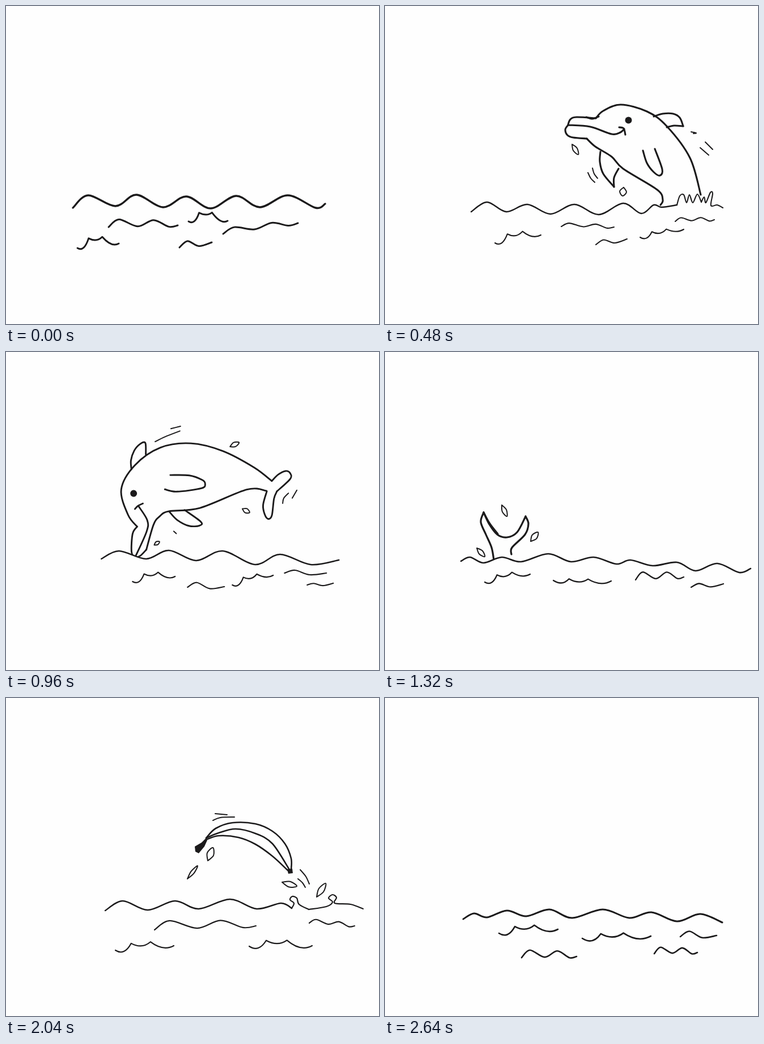
Write an HTML page with a canvas that moves like this. It is 658 by 561 pixels and loops after 2760 ms.

```html
<!DOCTYPE html>
<html lang="en">
<head>
<meta charset="utf-8">
<title>Dolphin and banana</title>
<style>
html, body { margin: 0; width: 100%; height: 100%; overflow: hidden; background: #fefefe; }
canvas { display: block; }
</style>
</head>
<body>
<canvas id="stage" width="658" height="561"></canvas>
<script>
const ctx = document.getElementById('stage').getContext('2d');
const INK = '#1b1a1b', PAPER = '#fefefe', STEP = 120, STEPS = 23;

// Smooth curve through points given as x, y, x, y, ...
function spline(...n) {
  const path = new Path2D(), last = n.length / 2 - 1;
  const at = i => {
    const k = 2 * Math.max(0, Math.min(last, i));
    return [n[k], n[k + 1]];
  };
  path.moveTo(...at(0));
  for (let i = 0; i < last; i++) {
    const a = at(i - 1), b = at(i), c = at(i + 1), d = at(i + 2);
    path.bezierCurveTo(b[0] + (c[0] - a[0]) / 6, b[1] + (c[1] - a[1]) / 6,
      c[0] - (d[0] - b[0]) / 6, c[1] - (d[1] - b[1]) / 6, ...c);
  }
  return path;
}

function pen(...n) {
  ctx.stroke(spline(...n));
}

function blot(shape) {
  ctx.fill(new Path2D(`M${shape}Z`));
}

function eye(x, y) {
  ctx.beginPath();
  ctx.arc(x, y, 6, 0, 7);
  ctx.fill();
}

// Water drop: two bowed lines between its tips.
function drop(x1, y1, x2, y2, bow) {
  const mx = (x1 + x2) / 2, my = (y1 + y2) / 2, len = Math.hypot(x2 - x1, y2 - y1);
  const ox = (y2 - y1) / len * bow, oy = (x1 - x2) / len * bow;
  pen(x1, y1, mx + ox, my + oy, x2, y2, mx - ox, my - oy, x1, y1);
}

// Surface line that hides whatever is below it.
function surface(width, ...n) {
  const water = spline(...n);
  water.lineTo(n[n.length - 2], 561);
  water.lineTo(n[0], 561);
  ctx.fillStyle = PAPER;
  ctx.fill(water);
  ctx.lineWidth = width;
  pen(...n);
  ctx.lineWidth = width * .87;
}

// Three hanging arcs that meet in two cusps.
function cusps(x1, y1, x2, y2, h) {
  const w = x2 - x1, tops = [0, .27, .6, 1];
  const point = i => [x1 + w * tops[i], y1 + (y2 - y1) * tops[i] - (i % 3 ? h : 0)];
  ctx.beginPath();
  ctx.moveTo(x1, y1);
  for (let i = 1; i < 4; i++) {
    const [ax, ay] = point(i - 1), [bx, by] = point(i);
    ctx.quadraticCurveTo((ax + bx) / 2 + 2, Math.max(ay, by) + w * .1, bx, by);
  }
  ctx.stroke();
}

// Low wavy line with one or two bumps.
function ripple(x1, y1, x2, y2, h, bumps = 2) {
  const at = (f, up) => [x1 + (x2 - x1) * f, y1 + (y2 - y1) * f - up];
  if (bumps === 1) pen(x1, y1, ...at(.25, h), ...at(.6, -3), x2, y2);
  else pen(x1, y1, ...at(.15, h), ...at(.42, 0), ...at(.65, h * .8), ...at(.87, -2), x2, y2);
}

function calm() {
  surface(3.4, 118, 356, 145, 334, 193, 353, 230, 333, 277, 355, 318, 336,
    361, 357, 406, 335, 448, 355, 497, 334, 546, 356, 563, 349);
  ripple(181, 390, 303, 387, 13);
  cusps(322, 380, 391, 379, 15);
  ripple(383, 402, 515, 383, 9);
  cusps(126, 427, 199, 419, 15);
  ripple(306, 426, 363, 417, 9, 1);
}

function leaping() {
  surface(2.4, 152, 363, 180, 346, 214, 363, 251, 350, 292, 367, 334, 350,
    377, 368, 420, 348, 452, 366, 474, 351, 488, 355, 515, 351);
  pen(515, 351, 520, 335, 527, 333, 532, 347, 537, 333, 543, 347, 551, 332, 558, 346);
  pen(558, 346, 563, 337, 566, 347, 574, 329, 578, 331, 575, 352, 586, 351, 596, 356);
  ripple(311, 389, 404, 390, 6);
  cusps(194, 418, 275, 404, 12);
  ripple(372, 421, 427, 411, 6, 1);
  cusps(450, 408, 527, 394, 6);
  ripple(512, 380, 581, 377, 6);
}

function flying() {
  surface(2.5, 171, 362, 202, 348, 250, 362, 290, 347, 338, 365, 385, 348,
    442, 372, 486, 354, 540, 372, 590, 364);
  cusps(226, 402, 301, 393, 11);
  ripple(323, 412, 388, 411, 8, 1);
  cusps(402, 408, 474, 391, 9);
  ripple(494, 387, 568, 387, 5, 1);
  ripple(534, 408, 580, 405, 2, 1);
}

function diving() {
  surface(2.6, 134, 369, 150, 362, 174, 372, 206, 362, 240, 370, 288, 356, 328, 370,
    368, 362, 408, 374, 433, 367, 472, 377, 515, 371, 548, 386, 586, 373, 625, 389, 645, 382);
  cusps(176, 406, 256, 392, 9);
  cusps(297, 403, 399, 404, 3);
  ripple(442, 402, 527, 397, 13);
  ripple(540, 415, 597, 409, 5, 1);
}

function peeking() {
  surface(2.6, 134, 371, 153, 359, 193, 374, 236, 359, 276, 373, 330, 352,
    381, 368, 429, 348, 472, 367, 512, 353, 541, 370, 578, 360, 618, 371);
  ripple(173, 421, 298, 415, 10);
  cusps(286, 462, 384, 447, 9);
  ripple(364, 418, 475, 414, 12);
  cusps(498, 442, 603, 423, 12);
}

function splashing() {
  surface(2.5, 175, 375, 206, 358, 250, 374, 298, 358, 340, 372, 395, 355,
    442, 372, 485, 362, 504, 371);
  pen(504, 371, 508, 362, 501, 356, 505, 350, 513, 353, 517, 364, 534, 373);
  pen(534, 373, 565, 368, 576, 360, 569, 353, 576, 347, 583, 352, 580, 362, 608, 364, 630, 372);
  ripple(262, 409, 441, 402, 15);
  cusps(193, 445, 296, 437, 10);
  cusps(429, 438, 540, 437, 10);
  ripple(535, 397, 615, 402, 7);
}

function settled() {
  surface(3, 138, 390, 157, 380, 180, 387, 215, 375, 249, 385, 290, 373,
    330, 388, 384, 373, 431, 388, 470, 378, 515, 394, 556, 381, 595, 396);
  cusps(201, 415, 305, 408, 10);
  cusps(348, 424, 469, 420, 7);
  ripple(521, 421, 585, 419, 9, 1);
  ripple(241, 458, 338, 456, 13);
  ripple(475, 451, 551, 449, 11);
}

function rising() {
  ctx.lineWidth = 3.1;
  pen(323, 209, 327, 200, 338, 196, 372, 198);
  pen(372, 198, 385, 185, 416, 174, 462, 186, 497, 212, 538, 268, 557, 333);
  pen(323, 210, 362, 213, 400, 226, 415, 223, 422, 217);
  pen(413, 214, 421, 216, 424, 227);
  pen(323, 210, 318, 218, 322, 228, 332, 232, 356, 234);
  pen(356, 234, 371, 248, 400, 266, 420, 287, 480, 324, 490, 342, 486, 351);
  pen(355, 196, 366, 199, 377, 195);
  pen(474, 195, 490, 190, 508, 190, 520, 197, 526, 212);
  pen(526, 212, 510, 211, 497, 214);
  pen(380, 257, 379, 275, 385, 296, 404, 319);
  pen(404, 319, 404, 303, 412, 287);
  pen(455, 255, 462, 277, 474, 293, 485, 299, 489, 288, 476, 252);
  eye(429.5, 201.5);
  ctx.lineWidth = 2;
  drop(330, 244, 341, 262, 4);
  drop(421, 320, 419, 335, 6);
  pen(358, 294, 363, 304, 370, 311);
  pen(366, 286, 369, 296, 375, 304);
  pen(540, 222, 549, 224, 544, 225);
  pen(565, 240, 578, 253);
  pen(556, 250, 571, 263);
}

function airborne() {
  ctx.lineWidth = 2.9;
  pen(247, 191, 247, 165, 265, 122, 310, 103, 365, 106, 412, 133, 448, 178, 474, 235, 484, 273);
  pen(247, 191, 233, 196, 212, 220, 211, 231, 220, 235, 235, 233);
  pen(235, 233, 272, 206, 290, 201, 308, 204, 355, 233, 440, 258, 466, 281);
  pen(212, 231, 255, 208, 268, 193, 271, 165);
  pen(263, 164, 271, 163, 280, 165);
  pen(301, 105, 310, 92, 325, 82, 340, 79, 349, 83, 337, 100);
  pen(326, 169, 340, 185, 378, 207, 388, 205, 388, 196, 375, 176, 349, 155);
  pen(308, 205, 310, 225, 320, 246, 335, 257, 341, 253, 331, 219);
  pen(484, 273, 500, 271, 514, 274, 518, 282, 512, 290, 480, 293);
  pen(480, 293, 468, 300, 447, 321, 438, 322, 438, 312, 446, 297, 466, 282);
  eye(278, 141);
  ctx.lineWidth = 2;
  drop(463, 180, 480, 184, 4);
  drop(251, 235, 262, 236, 3);
  drop(413, 280, 419, 293, 4);
  pen(293, 237, 294, 243);
  pen(364, 92, 383, 96, 410, 104);
  pen(400, 91, 416, 98);
  pen(475, 316, 482, 310, 494, 308);
  pen(494, 319, 509, 313);
}

function tail() {
  ctx.lineWidth = 3.2;
  pen(192, 367, 188, 345, 178, 322, 169, 300, 174, 283);
  pen(174, 283, 184, 304, 198, 322, 215, 327, 233, 318, 248, 290);
  pen(174, 283, 185, 303, 199, 321);
  pen(248, 290, 253, 303, 247, 322, 224, 345, 223, 357);
  ctx.lineWidth = 2;
  drop(206, 270, 215, 290, 4);
  drop(257, 334, 270, 318, 5);
  drop(162, 346, 176, 361, 4);
}

function bananaTip() {
  ctx.lineWidth = 2.9;
  pen(489, 300, 505, 322, 513, 340, 515, 356);
  pen(495, 297, 515, 315, 529, 340, 537, 369);
  pen(495, 295, 520, 306, 541, 325, 551, 345, 552, 369);
  blot('477 291L483 286L495 291L489 301L479 297');
  ctx.lineWidth = 2.2;
  pen(472, 325, 477, 324, 484, 332);
  pen(529, 294, 538, 300);
  pen(521, 301, 536, 309);
  drop(560, 328, 559, 344, 3);
}

function banana() {
  ctx.lineWidth = 2.6;
  pen(353, 247, 370, 230, 400, 220, 440, 222, 470, 235, 492, 257, 503, 283, 503, 303);
  pen(353, 247, 375, 238, 405, 231, 440, 239, 470, 257, 500, 303);
  pen(353, 250, 375, 243, 410, 246, 440, 258, 470, 279, 497, 304);
  blot('333 262L345 255L353 247L355 251L350 262L340 274L334 271');
  blot('496 302L505 301L506 309L498 310');
  ctx.lineWidth = 2;
  drop(356, 287, 365, 264, 6);
  drop(320, 319, 338, 296, 3);
  drop(487, 325, 513, 332, 5);
  drop(548, 351, 564, 327, 5);
  pen(369, 204, 390, 206);
  pen(365, 216, 378, 211, 403, 210);
  pen(519, 303, 529, 315, 535, 328);
  pen(515, 319, 523, 326, 528, 334);
}

function place(figure, px, py, dx, dy, turn) {
  ctx.save();
  ctx.translate(px + dx, py + dy);
  ctx.rotate(turn);
  ctx.translate(-px, -py);
  figure();
  ctx.restore();
}

function drawFigure(step) {
  const flight = step - 6, slip = step - 17;
  if (step < 1) return;
  if (step < 5) {
    const left = 4 - step;
    place(rising, 520, 350, 20 * left, 62 * left, .17 * left);
  } else if (step < 11) {
    place(airborne, 360, 190, -10 * flight * Math.abs(flight), 12 * flight ** 2, -.33 * flight);
  } else if (step < 13) {
    place(tail, 210, 350, 0, 50 * (step - 11), 0);
  } else if (step === 14 || step === 15) {
    place(bananaTip, 520, 350, 0, 45 * (15 - step), 0);
  } else if (step > 15 && step < 21) {
    place(banana, 425, 270, -32 * slip, 8 * slip ** 2, -.4 * slip);
  }
}

const seas = [calm, leaping, flying, diving, peeking, splashing, settled];
const restSteps = [0, 4, 6, 11, 15, 17, 22];
const seaOrder = '00011122222333444556666';

function drawSea(step) {
  const index = +seaOrder[step], away = step - restSteps[index];
  ctx.save();
  ctx.translate(5 * Math.sin(5 * away), 3 * Math.sin(7 * away));
  seas[index]();
  ctx.restore();
}

function render(time) {
  const step = Math.floor(time / STEP) % STEPS;
  ctx.fillStyle = PAPER;
  ctx.fillRect(0, 0, 658, 561);
  ctx.fillStyle = ctx.strokeStyle = INK;
  ctx.lineCap = ctx.lineJoin = 'round';
  drawFigure(step);
  drawSea(step);
}

const start = performance.now();
function tick() {
  render(performance.now() - start);
  requestAnimationFrame(tick);
}
tick();
</script>
</body>
</html>
```
